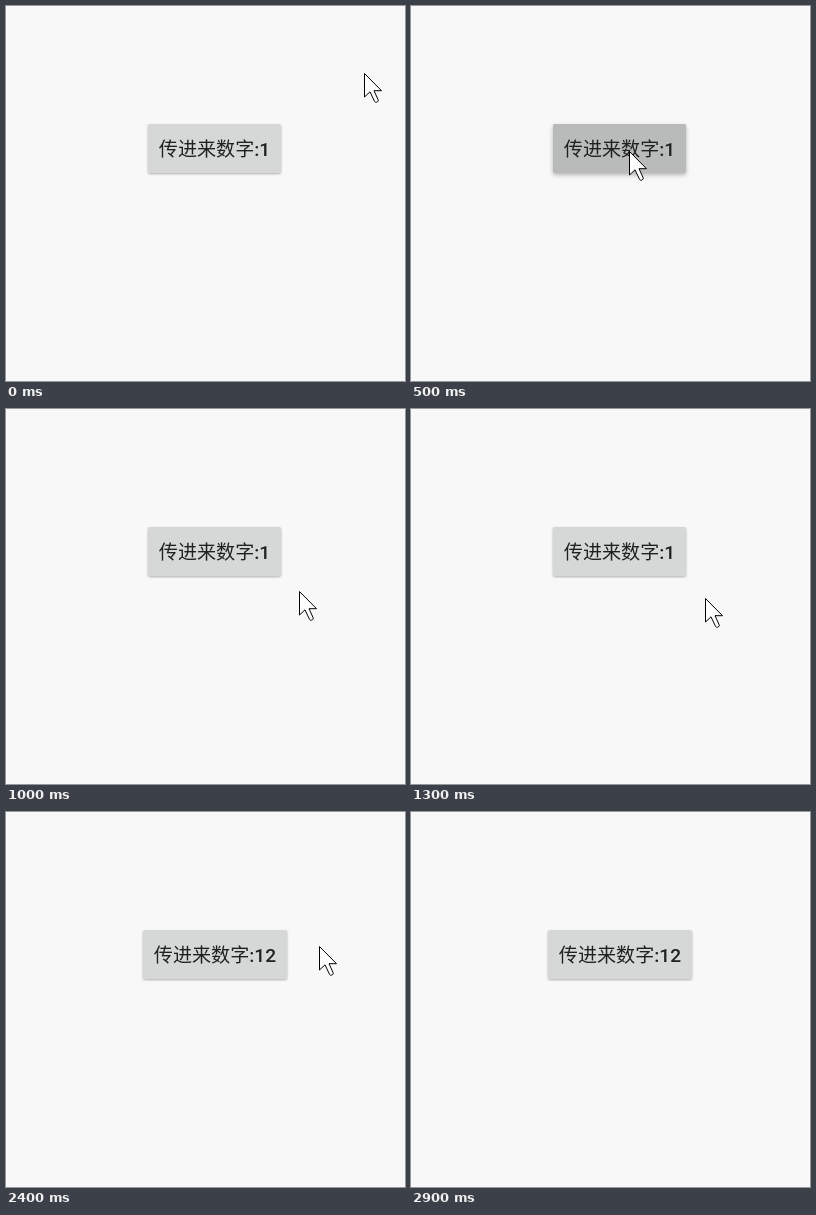
These frames come from a looping animation (399 by 375 pixels, 3.3 s). An HTML page:

```html
<!DOCTYPE html>
<html lang="zh-CN">
<head>
<meta charset="utf-8">
<style>
html, body { margin: 0; width: 100%; height: 100%; overflow: hidden; background: #f8f8f8; }
svg { display: block; width: 100vw; height: 100vh; }
text { font-size: 19.1px; fill: #1f2020; }
.cjk { font-family: "Noto Sans CJK SC", "Noto Sans CJK", sans-serif; font-weight: 400; }
.num { font-family: Roboto, sans-serif; font-weight: 500; }
</style>
</head>
<body>
<svg viewBox="0 0 399 375">
  <defs>
    <filter id="blur" x="-10%" y="-30%" width="120%" height="160%">
      <feGaussianBlur id="soft" stdDeviation="1"/>
    </filter>
  </defs>
  <rect width="399" height="375" fill="#f8f8f8"/>
  <rect id="shadow" y="119" height="49" rx="2" filter="url(#blur)"/>
  <rect id="button" y="118" height="49" rx="1.5"/>
  <text id="label" y="150"><tspan class="cjk">传进来数字</tspan><tspan class="num" id="num"></tspan></text>
  <path id="cursor" d="M.5 .5V24L6 18.8 10.6 28.5Q11.2 29.6 12.4 29.2L13.7 28.6Q14.7 28 14.2 26.9L10 17.7H17.5Z"
    fill="#fff" stroke="#000" stroke-linejoin="round"/>
</svg>
<script>
const LOOP = 3300, STEP = 100, CENTER = 208.7;
const $ = id => document.getElementById(id);
const button = $('button'), shadow = $('shadow'), label = $('label'), num = $('num');

const linear = k => k;
const easeIn = k => k * k;
const easeOut = k => k * (2 - k);

// pointer moves: start, end, target x, y, easing
const home = [358, 67];
const moves = [
  [0, 200, 218, 145, linear],
  [600, 800, 292, 169, linear],
  [800, 1300, 294, 189, easeOut],
  [2100, 2200, 304, 163, linear],
  [2200, 2400, 313, 134, linear],
  [2400, 2500, 318, 127, linear],
  [2600, 2900, 470, -20, easeIn]
];

const clamp = v => Math.min(1, Math.max(0, v));
const mix = (a, b, k) => Math.round(a + (b - a) * k);
const set = (el, attrs) => {
  for (const name in attrs) el.setAttribute(name, attrs[name]);
};

function pointer(t) {
  let [x, y] = home;
  for (const [from, to, toX, toY, ease] of moves) {
    const k = ease(clamp((t - from) / (to - from)));
    x += (toX - x) * k;
    y += (toY - y) * k;
  }
  return [Math.round(x), Math.round(y)];
}

function draw(ms) {
  const t = Math.floor((ms % LOOP) / STEP) * STEP;
  const [x, y] = pointer(t);
  const press = t < 500 ? 0 : clamp((800 - t) / 200);
  const done = t >= 2400;
  const width = done ? 144 : 133;
  const left = Math.round(CENTER - width / 2);

  set(button, { x: left, width, fill: `rgb(${mix(214, 184, press)},${mix(216, 187, press)},${mix(215, 186, press)})` });
  set(shadow, { x: left, width, y: 119 + press, fill: `rgba(0,0,0,${0.3 - 0.02 * press})` });
  set($('soft'), { stdDeviation: 1 + 1.3 * press });
  set(label, { x: left + 10.8 });
  num.textContent = done ? ':12' : ':1';
  set($('cursor'), { transform: `translate(${x} ${y})` });
}

const start = performance.now();
function tick() {
  draw(performance.now() - start);
  requestAnimationFrame(tick);
}
draw(0);
requestAnimationFrame(tick);
</script>
</body>
</html>
```
